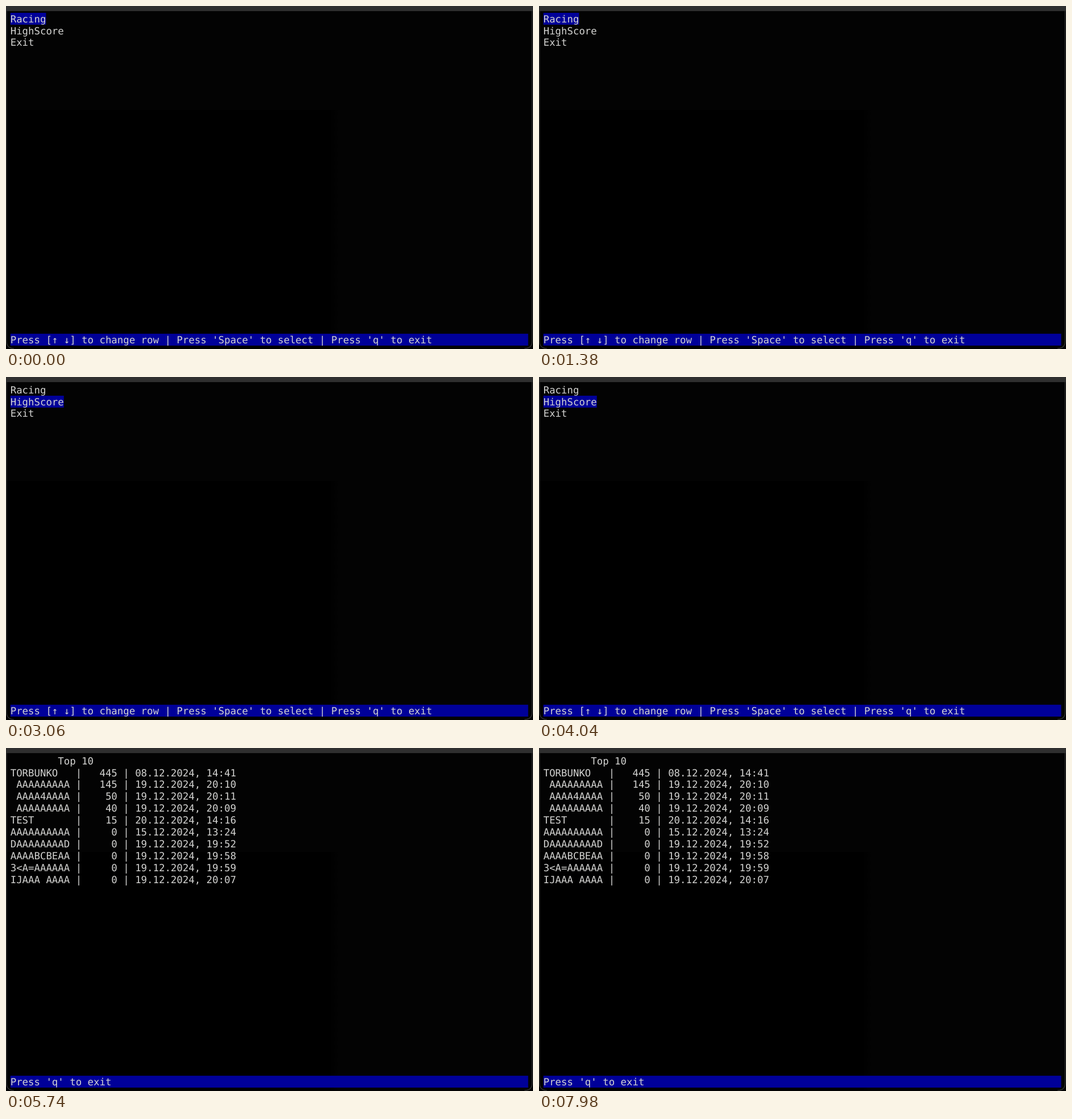
These frames come from a looping animation (927x604 px, 8000 ms). An HTML page:

```html
<!DOCTYPE html>
<html lang="en">
<head>
<meta charset="utf-8">
<title>Terminal menu</title>
<style>
  html, body { margin: 0; width: 100%; height: 100%; overflow: hidden; background: #000; }
  svg { display: block; width: 927px; height: 604px; }
  text {
    font: 17.36px "DejaVu Sans Mono", "Noto Sans Mono", monospace;
    fill: #d4d4d2;
    white-space: pre;
    text-rendering: geometricPrecision;
  }
  .bar { fill: #000099; }
</style>
</head>
<body>
<svg id="stage" viewBox="0 0 927 604" xmlns="http://www.w3.org/2000/svg">
  <defs>
    <linearGradient id="fade">
      <stop offset="0" stop-color="#000"/>
      <stop offset=".97" stop-color="#000"/>
      <stop offset="1" stop-color="#000" stop-opacity="0"/>
    </linearGradient>
  </defs>
  <rect width="927" height="604" fill="#030303"/>
  <rect x="2" y="183" width="585" height="420" fill="url(#fade)"/>
  <path d="M1 9V590Q1 603 14 603M912 603Q925.5 603 925.5 590V9" fill="none" stroke="#363636" stroke-width="1.2"/>
  <rect width="927" height="9" fill="#2f2f2f"/>
</svg>
<script>
const LOOP = 8000, SELECT_AT = 2020, OPEN_AT = 4220;
const LEFT = 7.7, TOP = 12, CELL = 10.452, ROW = 20.93, FOOTER = 27, RIGHT = 918.5;
const stage = document.getElementById('stage');

function add(parent, tag, attrs = {}, content = '') {
  const node = document.createElementNS('http://www.w3.org/2000/svg', tag);
  for (const key in attrs) node.setAttribute(key, attrs[key]);
  node.textContent = content;
  parent.append(node);
  return node;
}

const bar = (parent, row, width) => add(parent, 'rect', {
  class: 'bar', x: LEFT, y: TOP + row * ROW, width, height: ROW
});

const line = (parent, row, str, col = 0) => add(parent, 'text', {
  x: LEFT + col * CELL, y: TOP + row * ROW + 16.6
}, str);

function screen(footer) {
  const group = add(stage, 'g');
  bar(group, FOOTER, RIGHT - LEFT);
  line(group, FOOTER, footer);
  return group;
}

const menu = screen("Press [↑ ↓] to change row | Press 'Space' to select | Press 'q' to exit");
const items = ['Racing', 'HighScore', 'Exit'];
const marks = items.map((name, i) => bar(menu, i, name.length * CELL));
items.forEach((name, i) => line(menu, i, name));

const scores = screen("Press 'q' to exit");
line(scores, 0, 'Top 10', 8);
[
  ['TORBUNKO', 445, '08', '14:41'],
  [' AAAAAAAAA', 145, '19', '20:10'],
  [' AAAA4AAAA', 50, '19', '20:11'],
  [' AAAAAAAAA', 40, '19', '20:09'],
  ['TEST', 15, '20', '14:16'],
  ['AAAAAAAAAA', 0, '15', '13:24'],
  ['DAAAAAAAAD', 0, '19', '19:52'],
  ['AAAABCBEAA', 0, '19', '19:58'],
  ['3<A=AAAAAA', 0, '19', '19:59'],
  ['IJAAA AAAA', 0, '19', '20:07']
].forEach(([name, score, day, time], i) => {
  const points = String(score).padStart(6);
  line(scores, i + 1, `${name.padEnd(11)}|${points} | ${day}.12.2024, ${time}`);
});

const show = (node, on) => node.setAttribute('visibility', on ? 'inherit' : 'hidden');

function draw(t) {
  const open = t >= OPEN_AT;
  const selected = t >= SELECT_AT ? 1 : 0;
  show(menu, !open);
  show(scores, open);
  marks.forEach((mark, i) => show(mark, i === selected));
}

const start = performance.now();
function tick() {
  draw((performance.now() - start) % LOOP);
  requestAnimationFrame(tick);
}
tick();
</script>
</body>
</html>
```
